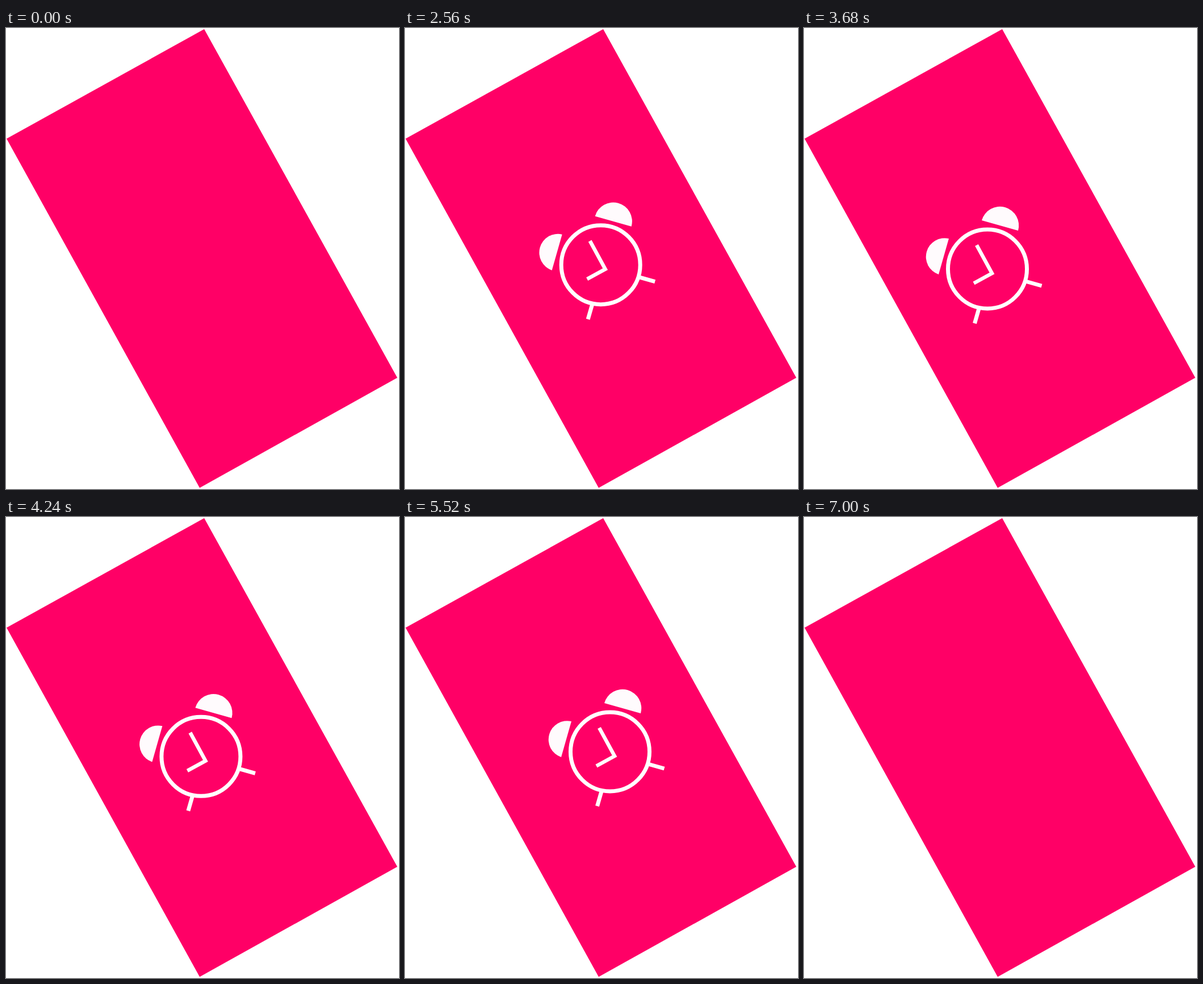
Recreate the animation shown at these times as an HTML page. Size 692 by 810 pixels, loop 8000 ms.

```html
<!DOCTYPE html>
<html lang="en">
<head>
<meta charset="utf-8">
<title>Alarm clock</title>
<style>
  html, body { margin: 0; width: 100%; height: 100%; overflow: hidden; background: #fff; }
  svg { display: block; width: 692px; height: 810px; }
  .line { fill: none; stroke: #fff; }
  .bell { fill: #fffbfd; }
</style>
</head>
<body>
<svg viewBox="0 0 692 810">
  <path fill="#f06" d="M1 194.5 349 2 689 614.5 341 808Z"/>
  <g id="clock">
    <g id="body" class="line">
      <circle cx="350" cy="411.5" r="69.5" stroke-width="7"/>
      <path stroke-width="6.5" d="M331 369.5 358 419 326 436.5"/>
      <path stroke-width="7" d="M417 433 445.5 441M335 481 327.5 507"/>
    </g>
    <path id="left" class="bell" d="M282 358A32.8 32.8 0 0 0 264 421Z"/>
    <path id="right" class="bell" d="M340 326A33.2 33.2 0 0 1 404 344Z"/>
  </g>
</svg>
<script>
  const LOOP = 8000, STEP = 40;
  const part = id => document.getElementById(id);
  const clock = part('clock'), body = part('body'), left = part('left'), right = part('right');

  // Shake path: step, x offset, y offset
  const shake = [
    [63, 0, 0], [66, -16, 14], [69, 18, -18], [72, -29, 29], [76, -2, 2], [79, 12, -9], [82, -8, 7], [84, 0, 0],
    [87, 26, -13], [90, -39, 26], [92, -27, 12], [95, 17, -24], [98, -14, 15], [101, 12, -6], [105, 0, 0],
    [108, -20, 28], [111, 22, -14], [114, -39, 9], [117, 14, -8], [120, 3, 4], [123, -9, 6], [126, 0, 0],
    [129, 16, -28], [132, -10, 17], [135, 4, -14], [138, 11, 1], [141, -7, 8], [144, 5, -4], [147, 0, 0]
  ];

  const progress = (t, from, to) => Math.min(1, Math.max(0, (t - from) / (to - from)));

  // Ease out with a 20% overshoot
  function pop(p) {
    const s = 2.595, q = p - 1;
    return p <= 0 ? 0 : q * q * ((s + 1) * q + s) + 1;
  }

  function offset(step) {
    const i = shake.findIndex(k => k[0] > step);
    if (i < 1) return [0, 0];
    const a = shake[i - 1], b = shake[i], p = progress(step, a[0], b[0]);
    return [1, 2].map(n => a[n] + (b[n] - a[n]) * p);
  }

  function scale(el, s, x, y, dx = 0, dy = 0) {
    el.setAttribute('visibility', s > 0.001 ? 'inherit' : 'hidden');
    el.setAttribute('transform', `translate(${x + dx} ${y + dy}) scale(${s}) translate(${-x} ${-y})`);
  }

  function draw(t) {
    const bells = pop(progress(t, 840, 1320));
    scale(body, pop(progress(t, 0, 840)), 373, 432);
    scale(left, bells, 262, 388.5);
    scale(right, bells, 372.5, 323.5);
    scale(clock, 1 - progress(t, 6440, 7000) ** 2, 343.5, 405, ...offset(t / STEP));
  }

  const start = performance.now();
  function tick() {
    const t = (performance.now() - start) % LOOP;
    draw(Math.floor(t / STEP) * STEP);
    requestAnimationFrame(tick);
  }
  tick();
</script>
</body>
</html>
```
